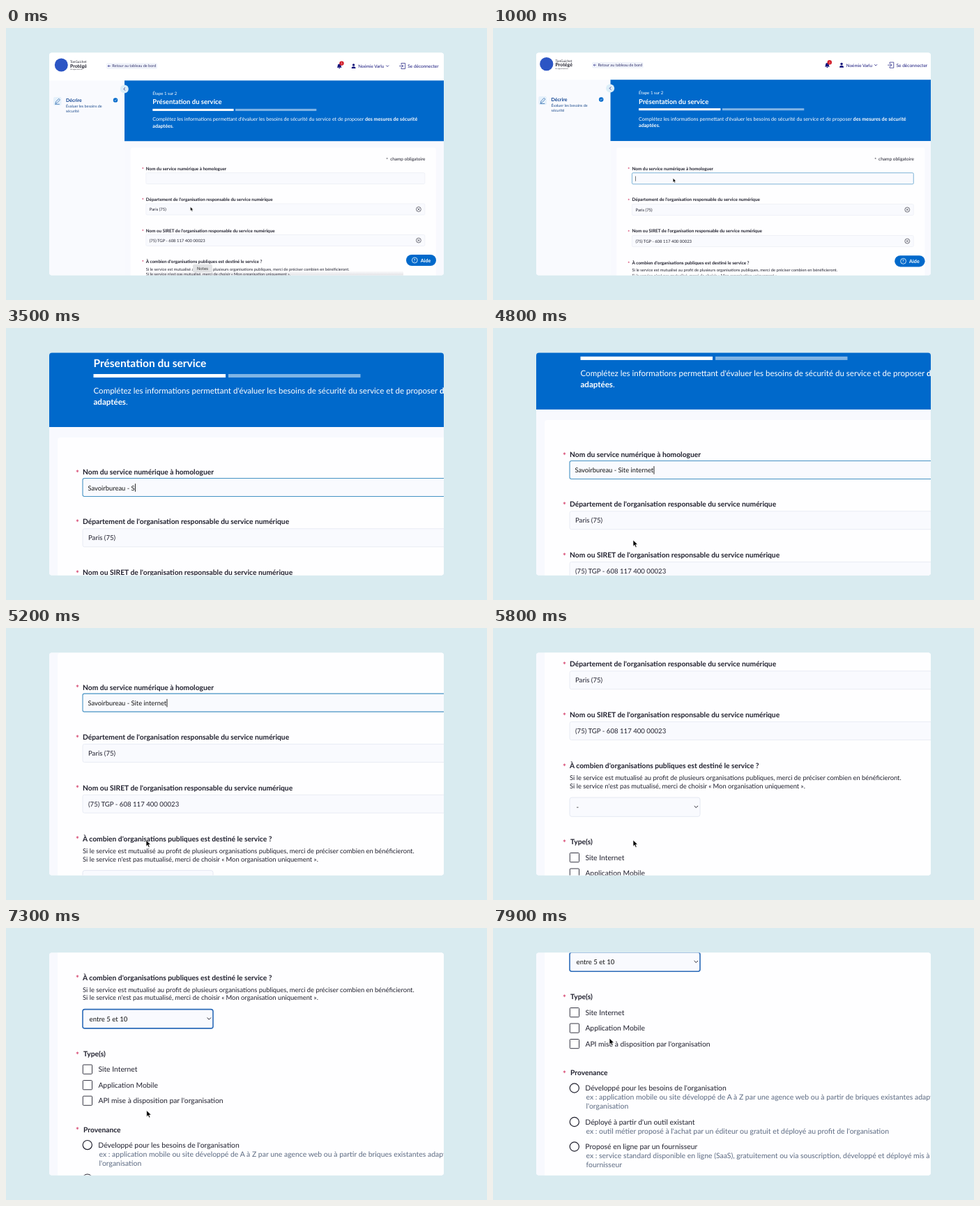
Animation of 690 by 390 pixels, one loop 8000 ms. Source, as an HTML page:

```html
<!DOCTYPE html>
<html lang="fr">
<head>
<meta charset="utf-8">
<title>Formulaire de service</title>
<style>
  html, body { margin: 0; width: 100%; height: 100%; overflow: hidden; background: #d9ebf0; }
  svg { display: block; width: 690px; height: 390px; }
  text { font-family: Lato, "Open Sans", sans-serif; white-space: pre; text-rendering: geometricPrecision; }
  .ui { font-family: Inter, "Liberation Sans", sans-serif; }
  .b { font-weight: 700; }
  .line { fill: none; stroke-linecap: round; stroke-linejoin: round; }
</style>
</head>
<body>
<svg id="stage" viewBox="0 0 690 390"></svg>
<script>
const LOOP = 8000, ZOOM = 1.63, CX = 345, CY = 195;
const INK = '#20202e', NAVY = '#17177c', BLUE = '#0069cb', GREY = '#5c6a82', PINK = '#d6436f';

// Drawing helpers: y is the optical middle of the text
const txt = (x, y, s, size, fill = INK, cls = '', extra = '') =>
  `<text x="${x}" y="${(y + size * 0.34).toFixed(2)}" font-size="${size}" fill="${fill}" class="${cls}" ${extra}>${s}</text>`;
const box = (x, y, w, h, fill, r = 0, extra = '') =>
  `<rect x="${x}" y="${y}" width="${w}" height="${h}" rx="${r}" fill="${fill}" ${extra}/>`;
const dot = (x, y, r, fill, extra = '') => `<circle cx="${x}" cy="${y}" r="${r}" fill="${fill}" ${extra}/>`;
const line = (d, color, w = 0.8) => `<path class="line" d="${d}" stroke="${color}" stroke-width="${w}"/>`;

const label = (y, s, x = 110) => txt(100, y + 1.4, '*', 11.5, PINK, 'b') + txt(x, y, s, 10.28, INK, 'b');
const field = (y, s, id = '') =>
  box(110, y, 652, 26, '#f9fafe', 2.5, `stroke="#e9ecf4" stroke-width="1" ${id && `id="${id}"`}`) +
  (s ? txt(118, y + 13.3, s, 9.62) +
    dot(747.5, y + 13, 5.6, 'none', `stroke="${INK}" stroke-width="1"`) +
    line(`M745.5 ${y + 11}l4 4m0 -4l-4 4`, INK, 1) : '');
const check = (y, s) =>
  box(110.3, y - 6.3, 13.2, 13.2, '#fff', 1, `stroke="${INK}" stroke-width=".9"`) + txt(132.4, y + 0.2, s, 10.33);
const radio = (y, s, ...notes) =>
  dot(116.8, y, 6.6, '#fff', `stroke="${INK}" stroke-width="1.2"`) + txt(132.3, y, s, 10.4) +
  notes.map((n, i) => txt(133.5, y + 13.2 + i * 12.8, n, 10.44, GREY)).join('');

const banner =
  box(59.7, -1, 747, 143, BLUE) +
  txt(125.5, 30, 'Étape 1 sur 2', 9.9, '#fff') +
  txt(125.5, 50.3, 'Présentation du service', 15.5, '#fff', 'b') +
  box(125.5, 66, 189.5, 5, '#fff') + box(319, 66, 189.5, 5, '#80b4e5') +
  txt(125.5, 90.5, `Complétez les informations permettant d'évaluer les besoins de sécurité du service et de proposer <tspan class="b">des mesures de sécurité</tspan>`, 11.55, '#fff') +
  txt(125.5, 106.2, '<tspan class="b">adaptées</tspan>.', 11.55, '#fff');

const form =
  box(59.7, 142, 747, 900, '#f8f9fe') + box(74, 157, 714, 900, '#fefeff', 4) +
  txt(671.5, 184.5, '*', 11, INK) + txt(681, 183.8, 'champ obligatoire', 10.5) +
  label(206.5, 'Nom du service numérique à homologuer') + field(215.5, '', 'name') +
  txt(117.5, 229.3, '', 9.4, '#111', '', 'id="typed"') + box(118, 223.2, 0.9, 11.5, '#111', 0, 'id="caret"') +
  label(277.7, "Département de l'organisation responsable du service numérique") + field(287.8, 'Paris (75)') +
  label(350.5, "Nom ou SIRET de l'organisation responsable du service numérique") + field(360.5, '(75) TGP - 608 117 400 00023') +
  label(423.5, "À combien d'organisations publiques est destiné le service ?") +
  txt(110, 441, 'Si le service est mutualisé au profit de plusieurs organisations publiques, merci de préciser combien en bénéficieront.', 9.37) +
  txt(110, 452.7, "Si le service n'est pas mutualisé, merci de choisir « Mon organisation uniquement ».", 9.37) +
  box(110, 469, 187, 27.3, '#f9fafe', 3, 'id="select"') +
  txt(119.6, 483, '-', 9.6, '#111', '', 'id="choice"') + line('M288.9 481.2l2.4 2.4l2.4 -2.4', INK, 1) +
  label(532.7, 'Type(s)', 111) +
  check(554.8, 'Site Internet') + check(577.3, 'Application Mobile') +
  check(599.8, "API mise à disposition par l'organisation") +
  label(641.5, 'Provenance', 111) +
  radio(663.5, "Développé pour les besoins de l'organisation",
    'ex : application mobile ou site développé de A à Z par une agence web ou à partir de briques existantes adaptées à', "l'organisation") +
  radio(712, "Déployé à partir d'un outil existant",
    "ex : outil métier proposé à l'achat par un éditeur ou gratuit et déployé au profit de l'organisation") +
  radio(747.5, 'Proposé en ligne par un fournisseur',
    'ex : service standard disponible en ligne (SaaS), gratuitement ou via souscription, développé et déployé mis à jour', 'fournisseur');

const chrome =
  box(62, 75, 108, 280, '#f9fafe') + box(62, 35, 566, 40.3, '#fff') +
  dot(79.3, 53, 9.5, '#2c55c4') +
  txt(92, 48.6, 'TonGuichet', 4.7, INK) + txt(92, 54.4, 'Protégé', 6.9, INK, 'b') + txt(92, 59.3, 'Un appui local sûr', 2.3, INK) +
  box(144, 50.3, 73, 8.4, '#f0f3fa', 2) + line('M149.5 54.5h-3.2m1.3 -1.3l-1.3 1.3l1.3 1.3', NAVY, 0.6) +
  txt(152.3, 54.5, 'Retour au tableau de bord', 5.55, '#35356f') +
  `<path d="M474.8 56.8q1 -0.8 1 -3a2.4 2.4 0 0 1 4.8 0q0 2.2 1 3z" fill="${NAVY}"/>` + box(477.2, 57.3, 2, 0.9, NAVY, 0.4) +
  dot(481.5, 50.6, 3.2, '#d3202c') + txt(480.5, 50.6, '1', 3.8, '#fff') +
  dot(498.6, 52.9, 1.7, NAVY) + `<path d="M495.8 58v-1.2q0 -1.6 2.8 -1.6t2.8 1.6v1.2z" fill="${NAVY}"/>` +
  txt(505.3, 54.7, 'Noémie Varlu', 6.25, NAVY) + line('M545.6 53.8l1.6 1.6l1.6 -1.6', NAVY) +
  line('M567 52.4v-1.9h5.6v8h-5.6v-1.9M564.5 54.5h5.2m-1.6 -1.7l1.7 1.7l-1.7 1.7', NAVY, 0.7) +
  txt(576.3, 54.7, 'Se déconnecter', 6.5, NAVY) +
  box(68, 99, 11.5, 12, '#e6f1fb', 2) +
  line('M71 108l0.6 -2.3l4.2 -4.4l1.7 1.7l-4.2 4.4zM70.5 109.3h6', '#1f5fa8', 0.7) +
  txt(86, 104, 'Décrire', 6.9, '#0a3f8f', 'b') +
  txt(86, 111.7, 'Évaluer les besoins de', 5.4, '#1b4a8c') + txt(86, 118.7, 'sécurité', 5.4, '#1b4a8c') +
  dot(157, 103.4, 3.2, BLUE) + line('M155.6 103.5l1 1l1.8 -2', '#fff', 0.7) +
  dot(169.8, 87.5, 6, '#dceef8') + line('M170.7 85.7l-1.8 1.8l1.8 1.8', NAVY) +
  box(574, 325, 43, 16, BLUE, 8) +
  dot(586.3, 333, 3.9, 'none', 'stroke="#fff" stroke-width=".8"') + txt(584.8, 333.1, '?', 5.6, '#fff', 'b') +
  txt(594.7, 333.2, 'Aide', 7.1, '#fff', 'b') +
  `<g id="tip">${box(205, 348, 365, 9, 'url(#shade)', 3)}${box(268, 338.8, 28, 11.6, '#e2e3e5', 2.5)}${txt(274, 344.7, 'Notes', 5.8, '#333', 'ui')}</g>`;

const OPTIONS = ['-', 'Mon organisation uniquement', '2', '3', '4', 'entre 5 et 10', 'entre 11 et 50', 'entre 51 et 100',
  'entre 101 et 500', 'entre 501 et 1 000', 'entre 1 001 et 5 000', 'plus de 5 000'];
const ROW = 14.33, TOP = 176.8;
const menu =
  box(104.5, 172.5, 188, 179, '#ebebeb', 4.5, 'stroke="#bfbfbf" stroke-width=".7" filter="url(#soft)"') +
  box(108, 0, 181, 14.4, '#4396f7', 2.5, 'id="hover"') +
  line('M111.3 184l1.9 2.2l3 -4.6', '#999', 1) +
  OPTIONS.map((s, i) => txt(120.3, TOP + ROW * (i + 0.5), s, 8.3, i ? '#1a1a1a' : '#999', 'ui option')).join('');

const around = s => `translate(${CX} ${CY}) scale(${s}) translate(${-CX} ${-CY})`;

document.getElementById('stage').innerHTML = `
  <defs>
    <clipPath id="window">${box(62, 35.5, 566, 319, '#000', 4)}</clipPath>
    <linearGradient id="shade" x2="0" y2="1">
      <stop stop-color="#445" stop-opacity="0"/><stop offset="1" stop-color="#445" stop-opacity=".2"/>
    </linearGradient>
    <filter id="soft" x="-20%" y="-20%" width="140%" height="140%">
      <feDropShadow dx="0" dy="2" stdDeviation="4" flood-opacity=".28"/>
    </filter>
  </defs>
  ${box(0, 0, 690, 390, '#d9ebf0')}
  <g clip-path="url(#window)">
    ${box(62, 35, 566, 320, '#fff')}
    <g id="camera">
      <g id="page">${banner}${form}</g>
      <g transform="${around(ZOOM)}">${chrome}</g>
      <g id="menu">${menu}</g>
      <path id="cursor" d="M0 0V9.2L2.1 7.2L3.6 10.6L5.2 9.9L3.8 6.6H6.7Z" fill="#000" stroke="#fff" stroke-width=".7"/>
    </g>
  </g>`;

const $ = id => document.getElementById(id);
const set = (id, attrs) => { for (const k in attrs) $(id).setAttribute(k, attrs[k]); };
const show = (id, on) => set(id, { visibility: on ? 'visible' : 'hidden' });
const options = [...document.querySelectorAll('.option')];

// Eased value along [time, value] keys
function track(t, keys) {
  if (t <= keys[0][0]) return keys[0][1];
  for (let i = 1; i < keys.length; i++) {
    const [t0, a] = keys[i - 1], [t1, b] = keys[i];
    if (t < t1) {
      const u = (t - t0) / (t1 - t0);
      return a + (b - a) * u * u * (3 - 2 * u);
    }
  }
  return keys[keys.length - 1][1];
}

const SCALE = [[950, 1 / ZOOM], [1650, 1]];
const SCROLL = [[4540, 0], [5800, 226], [5950, 226], [6300, 299], [7000, 299], [7700, 434]];
const MOVE_X = [[50, 213.8], [600, 205], [4400, 205], [4700, 201], [6500, 201], [6780, 201.7], [7600, 201.7], [7880, 167]];
const MOVE_Y = [[50, 295.2], [600, 228], [4400, 228], [4700, 304], [6000, 304], [6400, 187], [6500, 187], [6780, 261.5], [7600, 261.5], [7880, 158]];

const NAME = 'Savoirbureau - Site internet';
function typedCount(t) {
  if (t < 1650) return 0;
  if (t < 3450) return 1 + Math.min(14, Math.max(0, Math.floor((t - 1750) / 100)));
  return Math.min(NAME.length, 16 + Math.max(0, Math.floor((t - 3500) / 80)));
}

function draw(t) {
  const x = track(t, MOVE_X), y = track(t, MOVE_Y);
  set('camera', { transform: around(track(t, SCALE)) });
  set('page', { transform: `translate(0 ${-track(t, SCROLL)})` });
  set('cursor', { transform: `translate(${x} ${y})` });
  show('cursor', t < 1650 || t >= 4400);
  set('tip', { opacity: track(t, [[150, 1], [400, 0]]) });

  const typing = t >= 550 && t < 6450;
  set('name', { stroke: typing ? '#4592c4' : '#e9ecf4', 'stroke-width': typing ? 1.1 : 1 });
  $('typed').textContent = NAME.slice(0, typedCount(t));
  set('caret', { x: 117.8 + $('typed').getComputedTextLength() });
  show('caret', typing);

  const open = t >= 6450 && t < 6950, chosen = t >= 6950;
  set('select', { stroke: t >= 6450 ? '#2a6ab8' : '#e4e8f2', 'stroke-width': chosen ? 1.6 : open ? 1.4 : 1 });
  $('choice').textContent = chosen ? OPTIONS[5] : OPTIONS[0];
  const row = Math.floor((y - TOP) / ROW);
  show('menu', open);
  show('hover', open && row > 0);
  set('hover', { y: TOP + ROW * row });
  options.forEach((o, i) => o.setAttribute('fill', !i ? '#999' : i === row ? '#fff' : '#1a1a1a'));
}

const start = performance.now();
function tick() {
  draw((performance.now() - start) % LOOP);
  requestAnimationFrame(tick);
}
tick();
</script>
</body>
</html>
```
